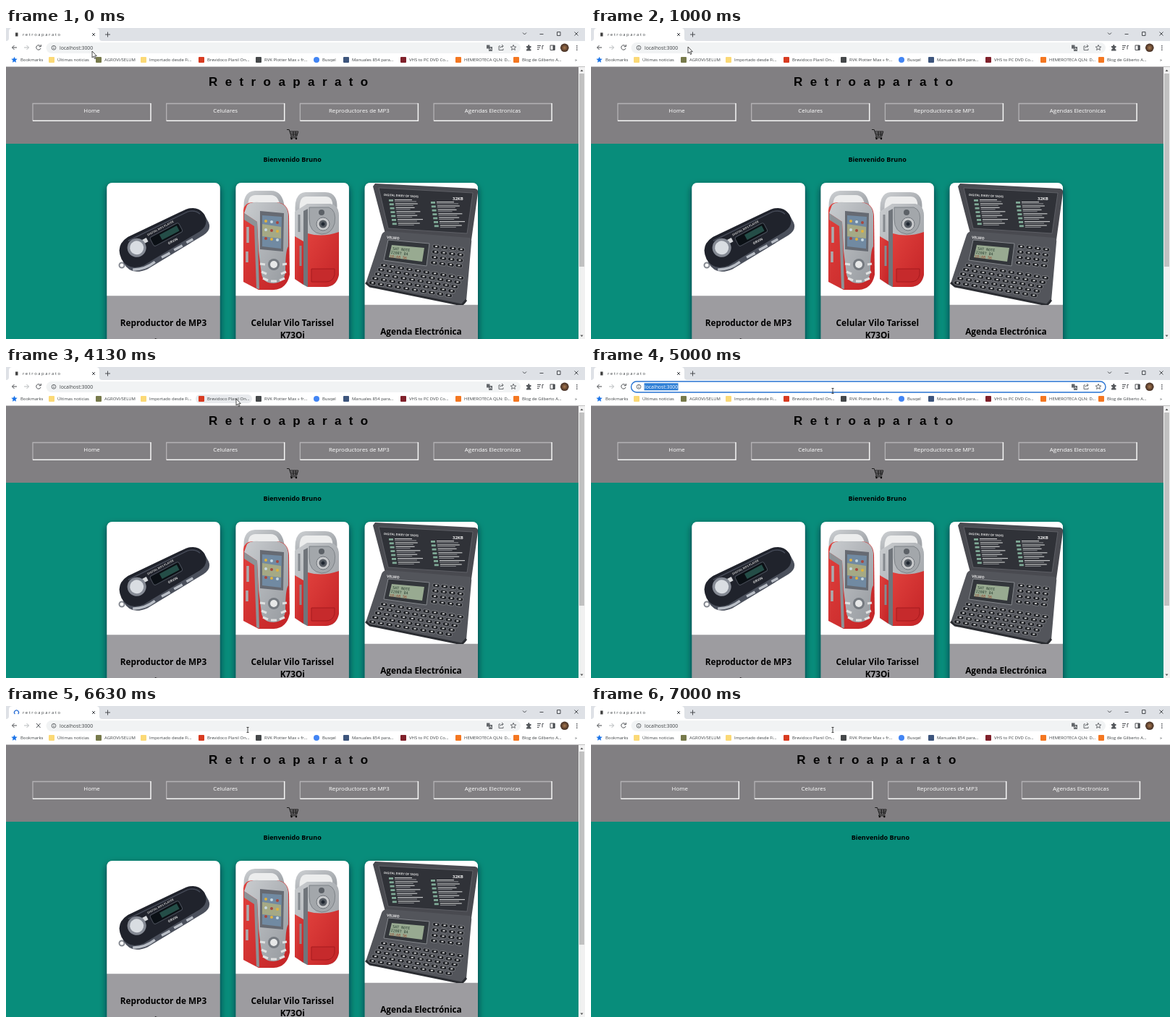
Write an HTML page that moves like this. It is 800 px wide and 430 px high and loops after 8000 ms.

```html
<!DOCTYPE html>
<html lang="es">
<head>
<meta charset="utf-8">
<title>Tienda</title>
<style>
html, body { margin: 0; width: 100%; height: 100%; overflow: hidden; background: #fff; }
svg { display: block; width: 800px; height: 430px; font-family: "Open Sans", "Noto Sans", sans-serif; }
.line { fill: none; stroke: #4a4d51; stroke-width: 1; }
.bold { font-weight: 700; text-anchor: middle; }
#marks text { font-size: 5.95px; fill: #3c4043; }
#menu text { font-size: 7.9px; fill: #fff; text-anchor: middle; }
.name { font-size: 11.8px; }
</style>
</head>
<body>
<svg viewBox="0 0 800 430">
  <defs>
    <filter id="shade" x="-20%" y="-20%" width="140%" height="140%">
      <feDropShadow dx="0" dy="4" stdDeviation="5" flood-color="#012" flood-opacity=".65"/>
    </filter>
    <linearGradient id="silver" x2="1" y2="1">
      <stop stop-color="#c9cccf"/><stop offset="1" stop-color="#969a9f"/>
    </linearGradient>
    <linearGradient id="red" x2="1" y2="1">
      <stop stop-color="#e0403c"/><stop offset="1" stop-color="#c32427"/>
    </linearGradient>
    <radialGradient id="face"><stop stop-color="#a87950"/><stop offset="1" stop-color="#3f2a20"/></radialGradient>
    <clipPath id="photo"><path d="M495.700 383V222q0-8 8-8H644q8 0 8 8V383Z"/></clipPath>
  </defs>

  <!-- page -->
  <rect y="54" width="800" height="376" fill="#088d7b"/>
  <rect y="53" width="800" height="107" fill="#817f82"/>
  <g id="content">
    <text x="280" y="79.500" font-family="Liberation Sans, Arial, sans-serif" font-size="17" font-weight="700" letter-spacing="10.400">Retroaparato</text>
    <g id="menu"></g>
    <path d="M388 140.500h3.200l3 9.300h7.600l2-6.800h-11.800M393 145.300h10M393.800 147.500h8.800M397 143v6.500M400.300 143v6.500M394.200 149.800l-1 2h9" fill="none" stroke="#111" stroke-width=".900"/>
    <circle cx="394.500" cy="153" r="1.200"/><circle cx="401" cy="153" r="1.200"/>
    <text id="greet" class="bold" x="395.600" y="185" font-size="9">Bienvenido Bruno</text>
  </g>

  <g id="shop">
    <g id="cards"></g>

    <!-- music player -->
    <circle cx="160" cy="328" r="3.500" fill="none" stroke="#858991" stroke-width="2"/>
    <g transform="translate(217 289) rotate(-28)">
      <path d="M-43-19L48-14Q65-11 65 3V12Q64 23 50 24L-40 29Q-65 27-65 6Q-64-17-43-19Z" fill="#4b505c"/>
      <path d="M-43-23L46-19Q64-16 65 0Q64 16 48 17L-42 22Q-64 20-65 0Q-64-21-43-23Z" fill="#20232c"/>
      <path d="M-45-18L46-15Q57-13 60-4" fill="none" stroke="#454a57" stroke-width="1.500"/>
      <rect x="-17" y="-8" width="45" height="14" rx="3" fill="#0b1015" stroke="#4b505b"/>
      <rect x="-3" y="-5" width="27" height="8" fill="#244d47"/>
      <text x="-18" y="-11" font-size="4" font-weight="700" fill="#bbb">DIGITAL MP3 PLAYER</text>
      <text x="2" y="13" font-size="4.500" font-weight="700" fill="#ddd">ORVIN</text>
      <rect x="-28" y="-10" width="7" height="6" fill="#d8dadd"/>
      <circle cx="-39" cy="-4" r="13" fill="#858a94"/><circle cx="-39" cy="-4" r="9.500" fill="#d9dde2"/>
      <path d="M-58 20Q-44 28-26 25M-15 24h13M5 23h13M25 22h10" stroke="#b9bec6" stroke-width="3.500" fill="none"/>
    </g>

    <!-- phone, front and back -->
    <path d="M332 252Q329 229 344 228H366Q380 228 382 249" fill="#eceded" stroke="url(#silver)" stroke-width="6"/>
    <path d="M328 252Q329 242 340 241H374Q390 242 391 260L392 341Q388 361 370 362H349L328 351Z" fill="url(#red)"/>
    <path d="M333 245Q338 240 350 241H374Q389 243 390 258V302Q386 307 386 338Q384 352 370 353Q355 353 353 340L349 308L347 268L329 256Z" fill="url(#silver)"/>
    <path d="M329 256L347 268L350 361L346 360L343 274L329 265Z" fill="#8d9296"/>
    <path d="M351 253L384 256L383 309L351 306Z" fill="#666a72"/>
    <path d="M354 259L381 261L380 305L354 302Z" fill="#718aa2"/>
    <path d="M354 271L380 275L380 291L354 288Z" fill="#a5a985"/>
    <g id="apps"></g>
    <circle cx="370" cy="327" r="8" fill="#757a80"/><circle cx="370" cy="327" r="5" fill="#e7e8e8"/>
    <path d="M351 326l7 1M382 327l6-1M353 337l7 3M380 340l7-3M355 346l7 3M378 349l7-3M366 350h8" stroke="#e0e1e1" stroke-width="3"/>
    <path d="M334 275v22M333 309v15" stroke="#a9acaf" stroke-width="3.500"/>
    <path d="M403 257Q400 231 414 230H441Q457 230 454 253" fill="#eceded" stroke="url(#silver)" stroke-width="6"/>
    <path d="M399 254L416 243H448Q460 245 460 259V341Q457 357 442 358H416L399 347Z" fill="url(#silver)"/>
    <path d="M399 288L411 295V355L399 347Z" fill="url(#red)"/>
    <path d="M411 253L417 250V358L411 355Z" fill="#70757b"/>
    <path d="M417 284Q437 290 460 282V341Q457 357 442 358H417Z" fill="url(#red)"/>
    <path d="M422 333h32v8q-2 10-12 10h-20Z" fill="#c62a2c" stroke="#a61b1e"/>
    <path d="M405 258v24M407 301v28" stroke="#858a8f" stroke-width="3"/>
    <path d="M419 248H446Q457 252 454 270Q450 285 436 285Q419 283 419 264Z" fill="#a3a7ab" stroke="#7d8287"/>
    <circle cx="436" cy="255" r="4" fill="#5c6167"/>
    <circle cx="438" cy="271" r="9" fill="#c8cacc" stroke="#71767c"/>
    <circle cx="438" cy="271" r="5.500" fill="#565c63"/><circle cx="438" cy="271" r="2.500" fill="#202832"/>

    <!-- organizer -->
    <g clip-path="url(#photo)">
      <path d="M510 215L648 222Q653 223 652 228L643 293L524 284L507 219Z" fill="#494a50"/>
      <path d="M515 221L645 228L637 284L528 277Z" fill="#303238" stroke="#66686e" stroke-width=".800"/>
      <text x="522" y="232" font-size="4" font-weight="700" fill="#ddd" transform="rotate(3 522 232)">DIGITAL DIARY OF TASKS</text>
      <text x="617" y="238" font-size="6" font-weight="700" fill="#eee">32KB</text>
      <g id="notes"></g>
      <path d="M527 281L640 290Q644 291 643 297L636 377Q635 383 629 382L502 357Q496 355 498 350L519 286Q521 281 527 281Z" fill="#53555b"/>
      <path d="M497 352L503 357L630 383L636 376" fill="none" stroke="#2b2d32" stroke-width="3"/>
      <path d="M528 293L585 298L581 329L522 321Z" fill="#33363b" stroke="#85888d"/>
      <path d="M533 300L578 304L575 323L529 317Z" fill="#98aa91"/>
      <g transform="rotate(6 533 307)" font-family="DejaVu Sans Mono, monospace" font-size="5" fill="#273c2f">
        <text x="534" y="306.500">SAT NOTE</text><text x="532" y="312">2208T 84</text><text x="531" y="317.500" fill="#98432c">10:08 56</text>
      </g>
      <text x="526" y="291" font-size="5" font-weight="700" fill="#eee" transform="rotate(5 526 291)">VELMO</text>
      <g id="keys"></g>
    </g>

    <g class="bold">
      <text class="name" x="217.500" y="412">Reproductor de MP3</text>
      <text class="name" x="395.800" y="412">Celular Vilo Tarissel</text>
      <text class="name" x="395.800" y="428.500">K73Oi</text>
      <text class="name" x="573.500" y="424">Agenda Electrónica</text>
      <text x="217.500" y="435.500" font-size="9.500">$1000</text>
    </g>
    <rect x="791" y="54" width="9" height="376" fill="#f1f1f1"/>
    <rect x="792" y="63" width="7" height="267" fill="#c1c1c1"/>
    <path d="M793.500 60l2-2.500 2 2.500ZM793.500 424.500l2 2.500 2-2.500Z" fill="#555"/>
  </g>

  <!-- browser -->
  <rect width="800" height="53.500" fill="#fff"/>
  <path d="M0 0H800V18H133Q129 18 129 14V5Q129 0 124 0H9Q4 0 4 5V14Q4 18 0 18Z" fill="#dee1e6"/>
  <rect id="icon" x="13" y="6.500" width="3.500" height="5" fill="#444"/>
  <path id="spin" d="M14.500 6A3 3 0 1 1 11.500 9" fill="none" stroke="#2b6fd6" stroke-width="1.300"/>
  <text x="23" y="11" font-size="5.800" letter-spacing="1.600" fill="#3c4043">retroaparato</text>
  <path class="line" d="M119 7l4 4m0-4l-4 4M140.500 5.500v7M137 9h7M714 6.500l2.500 2.500 2.500-2.500M737.500 8.500h5M761.500 5.500h4.500v5h-4.500ZM785.500 5.500l5 5m0-5l-5 5"/>
  <path class="line" d="M15 27H8.500M11.500 24l-3 3 3 3"/>
  <path class="line" d="M25 27h6.500M28.500 24l3 3-3 3" style="stroke:#b5b8bb"/>
  <path id="reload" class="line" d="M47.500 25A3.200 3.200 0 1 0 48 28M48.300 23v2.800h-2.800"/>
  <path id="stop" class="line" d="M42 24l5.500 6m0-6l-5.500 6"/>
  <rect id="bar" x="55.500" y="20" width="655.500" height="15" rx="7.500" fill="#f1f3f4"/>
  <circle class="line" cx="66" cy="27.300" r="2.900" style="stroke-width:.8"/>
  <path class="line" d="M66 26.800v2.200M66 25.200v.8" style="stroke-width:.8"/>
  <rect id="pick" x="73.500" y="22.300" width="47" height="10" fill="#2f7fd6"/>
  <text id="url" x="74" y="30" font-size="6.850">localhost:3000</text>
  <g id="tools">
    <path d="M664 23.500h4.500v5H664ZM667 26h5v6h-5Z" fill="#63676b"/>
    <path d="M668 30.500l1.500-3 1.500 3" fill="none" stroke="#fff" stroke-width=".700"/>
    <path class="line" d="M683 25h-2v5.500h6V28.500M682.500 28q1-3 4.500-3m-2-2l2.200 2-2.200 2" style="stroke-width:.8"/>
    <path class="line" d="M701 23.400l1.100 2.500 2.700.2-2.100 1.700.7 2.700-2.400-1.500-2.400 1.500.7-2.700-2.100-1.700 2.700-.2Z" style="stroke-width:.8"/>
  </g>
  <path d="M719 25h2q0-2 1.300-2t1.200 2h2v2q-1.500 0-1.500 1.300t1.500 1.200v2h-6.500v-2q1.600 0 1.600-1.300t-1.600-1.200Z" fill="#55585c"/>
  <path class="line" d="M734 24.500h5M734 27h4M734 29.500h2.500M741 24.500v5m0-5h1.800"/>
  <path class="line" d="M752 24h6v6.500h-6ZM757 24v6.500"/>
  <path d="M755.500 24h3v6.500h-3Z" fill="#4a4d51"/>
  <circle cx="771.800" cy="27.300" r="5.800" fill="url(#face)"/>
  <path d="M788.800 24v7" stroke="#4a4d51" stroke-width="1.400" stroke-dasharray="1.400 1.400"/>
  <rect id="hover" x="262" y="38" width="78" height="12" rx="6" fill="#e8eaed"/>
  <path d="M11.500 39.800l1.200 2.800 3 .2-2.300 2 .7 3-2.600-1.600-2.600 1.600.7-3-2.300-2 3-.2Z" fill="#1a73e8"/>
  <g id="marks"></g>

  <g id="cursor">
    <path id="arrow" d="M0 0V9l2-1.800 1.500 3.300 1.500-.7-1.500-3.100H6.300Z" fill="#fff" stroke="#222" stroke-width=".800"/>
    <path id="hand" d="M-1 1q1-1.500 2 0V4.500l4 1V8l-1 3.500H0L-3 7l1-.8 1 .8Z" fill="#fff" stroke="#222" stroke-width=".800"/>
    <path id="beam" d="M-1.500-3.500h3M0-3.500v7M-1.500 3.500h3" fill="none" stroke="#333" stroke-width=".900"/>
  </g>
</svg>
<script>
const $ = id => document.getElementById(id);
const fill = (id, parts) => { $(id).innerHTML = parts.join(""); };
const rect = (x, y, w, h, color, more = "") =>
  `<rect x="${x}" y="${y}" width="${w}" height="${h}" fill="${color}" ${more}/>`;
const grid = (rows, cols, draw) =>
  Array.from({ length: rows * cols }, (_, i) => draw(i / cols | 0, i % cols));

fill("menu", ["Home", "Celulares", "Reproductores de MP3", "Agendas Electronicas"].map((label, i) => {
  const x = 37 + i * 184.7;
  return `<path d="M${x} 128.500V104.500H${x + 163}" fill="none" stroke="#b4b2b5" stroke-width="1.300"/>
    <path d="M${x} 128.300H${x + 163}V104" fill="none" stroke="#f5f5f5" stroke-width="1.500"/>
    <text x="${x + 81.5}" y="117">${label}</text>`;
}));

// each card: image height
fill("cards", [156.3, 156.3, 168.8].map((h, i) => {
  const x = 139.4 + i * 178.15, w = 156.3;
  return rect(x, 214, w, 240, "#9d9ca0", 'rx="8" filter="url(#shade)"')
    + `<path d="M${x} ${214 + h}V222q0-8 8-8h${w - 16}q8 0 8 8V${214 + h}Z" fill="#fff"/>`;
}));

const marks = [
  [20, "Bookmarks"], [71, "Últimas noticias", "#fbd976"], [136, "AGROVI/SELUM", "#777a4b"],
  [198, "Importado desde Fi...", "#fbd976"], [278, "Brevidoco Planil On...", "#d83b21"],
  [357, "RVK Plotter Max » fr...", "#45484a"], [437, "Busqel", "#4285f4", 4],
  [478, "Manuales 854 para...", "#3d557c"], [557, "VHS to PC DVD Co...", "#80212b"],
  [633, "HEMEROTECA QLN: D...", "#f47721"], [713, "Blog de Gilberto A...", "#f47721"], [786, "»"]
];
fill("marks", marks.map(([x, label, color, round = 1]) =>
  (color ? rect(x - 12, 40, 8, 8, color, `rx="${round}"`) : "") + `<text x="${x}" y="46.300">${label}</text>`));

fill("apps", grid(3, 3, (r, c) =>
  rect(357 + c * 8, 265 + r * 12 + c, 4, 4, ["#e0b33f", "#c7d9e2", "#a9473d"][(r + c) % 3], 'rx="2"')));
fill("notes", grid(7, 2, (r, c) => {
  const x = 529 + c * 58 + r * .8, y = 237 + r * 5.4 + c * 3;
  return rect(x, y, 6, 2.8, "#7fa996") + rect(x + 8, y, 24 + r * 7 % 12, 1.2, "#c4c5c6")
    + rect(x + 8, y + 2.5, 30 - r * 5 % 11, .9, "#999b9e");
}));

const key = (x, y) => rect(x, y, 9.6, 5, "#1d1f23", `rx="2" stroke="#999ba0" stroke-width=".6" transform="rotate(9 ${x} ${y})"`)
  + rect(x + 3, y + 2.2, 3, 1.6, "#e4e4e4");
fill("keys", [
  ...grid(5, 10, (r, c) => key(518 - r * 4 + c * 11.7, 325 + r * 6.1 + c * 1.9)),
  ...grid(4, 4, (r, c) => key(590 + c * 11.5 - r, 299 + c * 1.3 + r * 7.5))
]);

// pointer stops: time, x, y
const path = [
  [0, 119, 32], [500, 128, 29], [875, 128, 29], [1000, 134, 26], [1625, 276, 36],
  [1875, 276, 36], [2375, 102, 27], [2875, 102, 27], [3000, 332, 419], [3625, 454, 346],
  [3750, 454, 346], [4125, 318, 44], [4625, 334, 33], [8000, 334, 33]
];
function pointer(t) {
  const i = path.findIndex(p => p[0] > t);
  const a = path[i - 1], b = path[i], k = (t - a[0]) / (b[0] - a[0]);
  return [a[1] + (b[1] - a[1]) * k, a[2] + (b[2] - a[2]) * k];
}
const show = (id, on) => { $(id).style.display = on ? "" : "none"; };

function draw(now) {
  const t = Math.floor(now % 8000 / 125) * 125;   // the screen refreshes eight times a second
  const within = (from, to) => t >= from && t < to;
  const loading = within(6000, 7000), blank = t >= 6750, focus = within(4750, 6000), picked = within(4625, 6000);

  $("cursor").setAttribute("transform", `translate(${pointer(t)})`);
  show("hand", within(3000, 3875));
  show("beam", t >= 4250);
  show("arrow", t < 3000 || within(3875, 4250));
  show("hover", within(4125, 4250));

  $("bar").setAttribute("fill", focus ? "#fff" : "#f1f3f4");
  $("bar").setAttribute("stroke", focus ? "#2773d2" : "none");
  $("bar").setAttribute("stroke-width", 1.4);
  show("pick", picked);
  $("url").setAttribute("fill", picked ? "#fff" : "#3c4043");

  show("spin", loading);
  $("spin").setAttribute("transform", `rotate(${(t - 6000) * .36} 14.5 9)`);
  show("icon", !loading);
  show("stop", loading);
  show("reload", !loading);

  show("shop", !blank);
  show("greet", !within(6750, 7000));
  show("tools", !within(6750, 7000));
  $("content").setAttribute("transform", `translate(${blank ? 4.3 : 0})`);
  requestAnimationFrame(draw);
}
requestAnimationFrame(draw);
</script>
</body>
</html>
```
